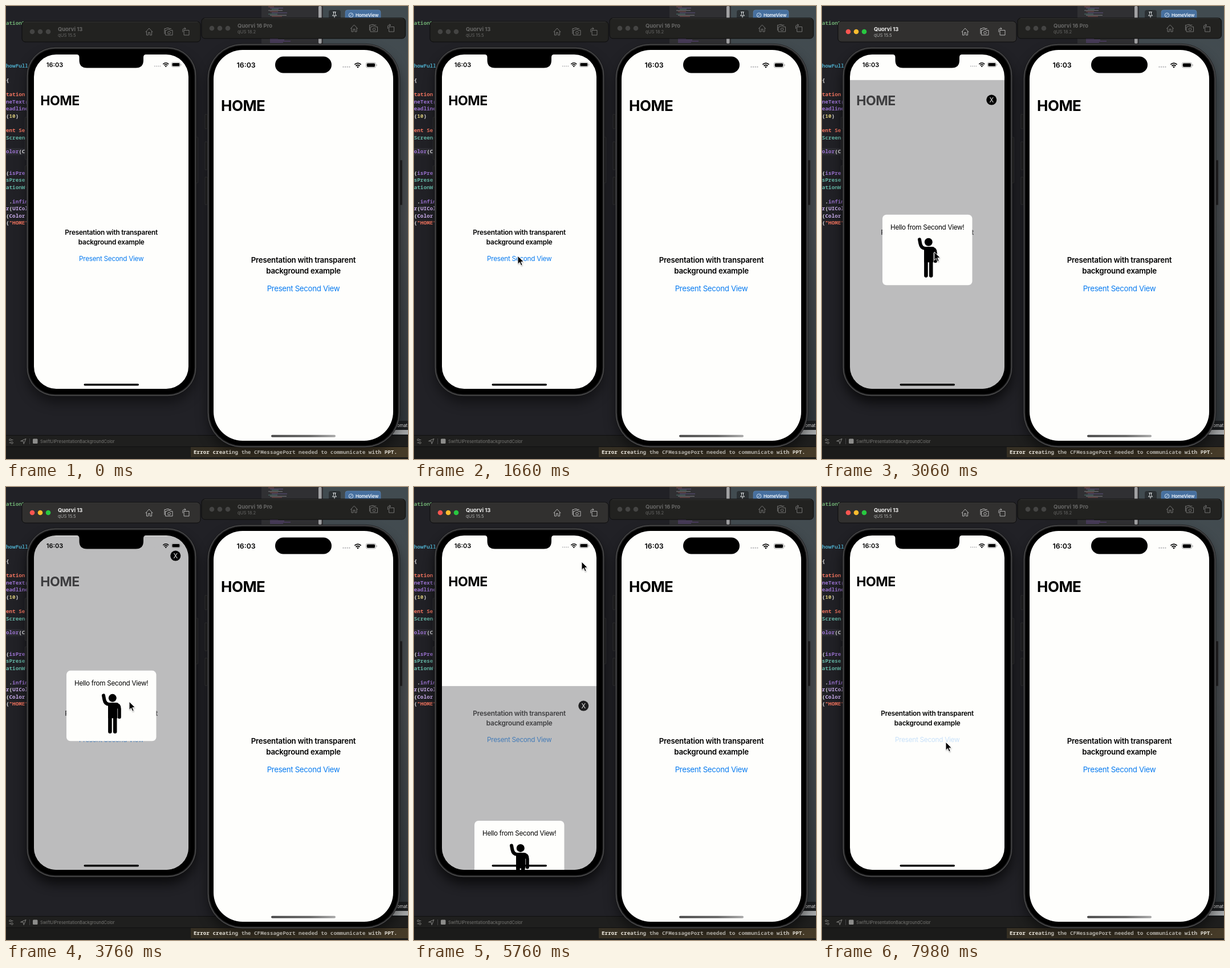
Write an HTML page that moves like this. It is 705 by 794 pixels and loops after 8000 ms.

```html
<!DOCTYPE html>
<html lang="en">
<head>
<meta charset="utf-8">
<title>Transparent presentation demo</title>
<style>
  html, body { margin: 0; width: 100%; height: 100%; overflow: hidden; background: #202024; }
  svg { display: block; width: 100vw; height: 100vh; font-family: Inter, Roboto, sans-serif; }
  .mono { font-family: "Noto Sans Mono", "DejaVu Sans Mono", monospace; white-space: pre; }
</style>
</head>
<body>
<svg id="stage" viewBox="0 0 705 794">
  <defs>
    <linearGradient id="canvasFill" x2="0" y2="1">
      <stop offset="0" stop-color="#414b50"/><stop offset=".5" stop-color="#474b4e"/><stop offset="1" stop-color="#30363a"/>
    </linearGradient>
    <linearGradient id="errorFill">
      <stop offset="0" stop-color="#352f23"/><stop offset="1" stop-color="#463b28"/>
    </linearGradient>
    <linearGradient id="barFill">
      <stop offset="0" stop-color="#4a4a4a"/><stop offset=".6" stop-color="#666"/><stop offset="1" stop-color="#aaa"/>
    </linearGradient>
    <filter id="blur" x="-30%" y="-30%" width="160%" height="160%"><feGaussianBlur stdDeviation="11"/></filter>
    <filter id="soft" x="-50%" y="-50%" width="200%" height="200%"><feGaussianBlur stdDeviation="1.2"/></filter>
    <clipPath id="screen"><rect x="49" y="85" width="271" height="586" rx="39"/></clipPath>
  </defs>
  <g id="desk"></g>
  <g id="devices"></g>
  <g id="cursor">
    <path d="M0 0V14.5L3.4 11.3 5.8 17 8.2 16 5.8 10.4H10.4Z" transform="translate(.5 1.5)" opacity=".35" filter="url(#soft)"/>
    <path d="M0 0V14.5L3.4 11.3 5.8 17 8.2 16 5.8 10.4H10.4Z" stroke="#fff" stroke-width="1" stroke-linejoin="round"/>
  </g>
</svg>
<script>
const $ = id => document.getElementById(id);
const LOOP = 8000;
const INK = "#000", PAPER = "#fefefc", BLUE = "#0a7cf0";

const rect = (x, y, w, h, fill, rx = 0, more = "") =>
  `<rect x="${x}" y="${y}" width="${w}" height="${h}" rx="${rx}" fill="${fill}" ${more}/>`;
const dot = (x, y, r, fill, more = "") => `<circle cx="${x}" cy="${y}" r="${r}" fill="${fill}" ${more}/>`;
const text = (x, y, size, str, fill = INK, weight = 400, more = "") =>
  `<text x="${x}" y="${y}" font-size="${size}" fill="${fill}" font-weight="${weight}" ${more}>${str}</text>`;
const path = (d, color, width = 1, more = "") =>
  `<path d="${d}" fill="none" stroke="${color}" stroke-width="${width}" stroke-linecap="round" stroke-linejoin="round" ${more}/>`;
const centred = (x, y, size, str, fill, weight, spacing) =>
  text(x, y, size, str, fill, weight, `text-anchor="middle" letter-spacing="${spacing}em"`);

// Editor window behind the simulators
function desk() {
  const red = "#f0745f", purple = "#9a72cf", lilac = "#cfb0f2", teal = "#65b6a6", white = "#e4e4e6";
  const code = [
    [33, "ationF", "#6fae72"], [108, "howFull", "#4ca6c2"], [133, "{", white],
    [158, "tation", red], [170.5, "neText(", purple], [183, "eadline", purple],
    [195.5, `(<tspan fill="#d5c77a">10</tspan>)`, white], [220.5, "ent Se", red],
    [233.5, "Screen", teal], [258, `olor<tspan fill="${white}">(C</tspan>`, purple],
    [295.5, `(<tspan fill="${purple}">isPre</tspan>`, white], [308, "sPrese", teal],
    [320.5, "ationW", teal], [345.5, ` .<tspan fill="${purple}">infin</tspan>`, white],
    [358, `r<tspan fill="${white}">(</tspan>UICol`, lilac],
    [370.5, `(<tspan fill="${lilac}">Color</tspan>`, white],
    [383, `(<tspan fill="${red}">"HOME"</tspan>`, white]
  ];
  const tints = ["#a85a58", "#7b6bb0", "#5f9c90", "#a9a9ac"];
  let mini = "";
  for (let i = 0; i < 9; i++)
    mini += rect(460 + (i % 3) * 3, 1 + i * 2.1, 10 + (i * 13) % 24, 1, tints[i % 4], 0, 'opacity=".65"');
  for (let i = 0; i < 4; i++)
    mini += rect(463, 57 + i * 2.1, 14 + (i * 11) % 24, 1, "#7652a0", 0, 'opacity=".7"');

  return rect(0, 0, 705, 794, "#212126") +
    rect(0, 249, 36, 12.5, "#2b2b31") +
    code.map(([y, s, c]) => text(0, y, 9.25, s, c, 600, 'class="mono"')).join("") +
    rect(448, 0, 108, 66, "#303033") + mini +
    rect(548, 0, 5.5, 66, "#a2a2a4", 2) +
    rect(556, 0, 149, 752, "url(#canvasFill)") +
    rect(566, 7, 21, 18, "#2b3033", 4) +
    path("M573.5 10.5H578.5M574.5 10.5V14.5L572.5 17H579.5L577.5 14.5V10.5M576 17V21", "#e0e3e5") +
    rect(595, 7, 62, 18, "#47709f", 4, 'stroke="#6089b5" stroke-width=".6"') +
    dot(605, 16, 3.8, "none", 'stroke="#dbe8f8" stroke-width=".9"') + path("M603.4 17.5L606.6 14.4", "#dbe8f8", .9) +
    text(613, 18.8, 8, "HomeView", "#f2f6fc", 600, 'letter-spacing="-.02em"') +
    rect(680, 727, 25, 16, "#1c1e20") + text(686, 738, 7.6, "omat", "#e8e8e8") +
    rect(675, 743, 30, 8, "#a5a7a8") +
    rect(0, 752, 705, 42, "#1f1f1e") + rect(0, 752, 705, 1, "#0f0f10") +
    rect(0, 772, 705, 22, "#1b1b1a") + rect(0, 772, 705, 1, "#101011") +
    path("M6 760.5H12M6 765.5H12", "#858583", 1.1) +
    dot(7.5, 760.5, 1.7, "#1f1f1e", 'stroke="#858583"') + dot(10.5, 765.5, 1.7, "#1f1f1e", 'stroke="#858583"') +
    path("M26 762.5L35 758.5 31.2 767.5 30.3 763.3Z", "#858583") + rect(41, 758, .8, 10, "#4b4b4d") +
    rect(47, 758.5, 8.5, 8.5, "#8c8c8a", 1.5) +
    text(60, 765.7, 7.45, "SwiftUIPresentationBackgroundColor", "#787875") +
    rect(324, 773, 381, 18, "url(#errorFill)") +
    text(329, 784.5, 9.3, "Error creating the CFMessagePort needed to communicate with PPT.", "#f0ece2", 700, 'class="mono"');
}

function titleBar(x, y, w, name, system, key) {
  const cy = y + 18, dots = ["#fb5550", "#fdbc2e", "#28c840"];
  const icons = [
    "M-6 .5L0 -6 6 .5M-4.5 -.5V6H-1.4V1.5H1.4V6H4.5V-.5",
    "M-5 -2.5H-3L-2 -4H2L3 -2.5H7V6H-5ZM-7 3.5V-5.5H-4L-3.5 -6.5H.5L1 -5.5H4.5"
  ];
  return rect(x, y, w, 36, "#222220", 6, `id="${key}Bar" stroke="#0c0c0c" stroke-width="1"`) +
    path(`M${x + 5} ${y + .9}H${x + w - 5}`, "#40403f", .7) +
    dots.map((c, i) => dot(x + 18 + 14 * i, cy, 4.3, "#444443") + dot(x + 18 + 14 * i, cy, 4.3, c, `class="${key}On"`)).join("") +
    text(x + 63, y + 16.8, 9.4, name, "#666665", 700, `id="${key}Name"`) +
    text(x + 63, y + 26.6, 7.7, system, "#666665", 400, `id="${key}System"`) +
    `<g id="${key}Icons" opacity=".52">` +
    path(icons[0], "#bbb", 1, `transform="translate(${x + w - 90} ${cy})"`) +
    `<g transform="translate(${x + w - 56} ${cy})">${path(icons[1], "#bbb") + dot(1, 1.8, 2.3, "none", 'stroke="#bbb"')}</g>` +
    path("M-3.5 -2.5H5V6H-3.5ZM-6 .5V-3Q-6 -5.5 -3.5 -5.5H-1M-2.8 -7.3L-1 -5.5 -2.8 -3.7", "#bbb", 1, `transform="translate(${x + w - 25} ${cy})"`) +
    "</g>";
}

function shell(x, y, w, h, r, buttons, key) {
  const ring = (inset, fill, stroke, width) =>
    rect(x + inset, y + inset, w - 2 * inset, h - 2 * inset, fill, r - inset, `stroke="${stroke}" stroke-width="${width}"`);
  return rect(x + 2, y + 14, w - 4, h - 4, "#000", r, `id="${key}Shadow" filter="url(#blur)" opacity=".5"`) +
    buttons.map(([bx, by, bh]) => rect(bx, by, 4, bh, "#19191a", 1, 'stroke="#39393b" stroke-width=".6"')).join("") +
    ring(.3, "#333334", "#161617", .8) + ring(1.3, "#262627", "#606061", .9) + ring(3.2, "#000", "#1c1c1d", 1);
}

function home(left, cx, top, lines, s, linkId) {
  return text(left, top, 33.2 * s, "HOME", INK, 700, 'letter-spacing="-.02em"') +
    centred(cx, lines[0], 17 * s, "Presentation with transparent", INK, 600, -.018) +
    centred(cx, lines[1], 17 * s, "background example", INK, 600, -.018) +
    `<g id="${linkId}">${centred(cx, lines[2], 17 * s, "Present Second View", BLUE, 400, -.026)}</g>`;
}

function status(x, y, dotsX, wifiX, batX, s) {
  let out = text(x, y, 15.8 * s, "16:03", INK, 600);
  for (let i = 0; i < 4; i++) out += dot(dotsX + i * 4.6 * s, y - 1.2, 1.5 * s, "#bcbcbe");
  return out +
    `<g transform="translate(${wifiX} ${y}) scale(${s})">` +
    path("M-7.2 -6.8Q0 -13.2 7.2 -6.8M-4.5 -3.9Q0 -7.7 4.5 -3.9", INK, 2.3, 'style="stroke-linecap:butt"') +
    `<path d="M-2.5 -1.9Q0 -4 2.5 -1.9L0 .8Z"/></g>` +
    `<g transform="translate(${batX} ${y}) scale(${s})">` +
    rect(0, -11.3, 22, 11.4, "none", 3.5, 'stroke="#999" stroke-width="1"') +
    rect(1.8, -9.5, 18.4, 7.8, INK, 2) + rect(23.2, -7.5, 1.5, 4, "#aaa", .8) + "</g>";
}

// Second view, drawn at its resting place
function sheet() {
  const wave = path("M171 364.5L172.3 371.5Q173.7 379.5 181 380.2H192Q198.8 380.6 198.8 388V402.5", INK, 6) +
    `<path d="M177 377.5H196V404.5H179V381Z"/>` +
    path("M182.4 400V427.8M191.2 400V427.8", INK, 6.6) + dot(186.8, 369, 7, INK) +
    path("M195.7 388V405", PAPER, .7);
  return rect(49, 85, 271, 586, "rgb(125,125,128)", 0, 'opacity=".5"') +
    `<g id="close">${dot(297.3, 119.7, 9, INK) + text(297.3, 123.7, 11.3, "X", "#e6e6e6", 400, 'text-anchor="middle"')}</g>` +
    rect(106, 321, 157.5, 123.5, PAPER, 7) +
    centred(184.7, 346.8, 11.7, "Hello from Second View!", INK, 400, -.026) + wave;
}

function devices() {
  const s1 = 271 / 390, s2 = 315 / 402;
  return shell(36, 72, 298, 612, 50, [[33.5, 195, 20], [33.5, 231, 38], [33.5, 280, 38], [332.5, 230, 80]], "a") +
    shell(353, 66, 338, 708, 61, [[349, 190, 25], [349, 238, 49], [349, 300, 48], [691, 270, 79]], "b") +
    rect(49, 85, 271, 586, PAPER, 39) +
    `<g clip-path="url(#screen)">${home(60.3, 184.7, 173.6, [400.6, 417.6, 447], s1, "link")}<g id="sheet">${sheet()}</g></g>` +
    `<path d="M124 85Q128.5 85 128.5 90V95Q128.5 108.5 142 108.5H227.5Q241 108.5 241 95V90Q241 85 245.5 85Z"/>` +
    status(70.8, 106.7, 260.8, 280.3, 290.3, s1) +
    rect(136.5, 662, 96.5, 3.5, INK, 1.75) +
    rect(364, 77, 315, 685, PAPER, 51) +
    home(377, 521.5, 184.3, [449.8, 468.6, 500], s2, "link2") +
    rect(472, 88.5, 99, 29, INK, 14.5) +
    status(404.6, 108, 591.5, 617, 631.3, s2) +
    rect(465, 751.7, 113, 4, "url(#barFill)", 2) +
    titleBar(28, 27, 313, "Quorvi 13", "qUS 15.5", "a") +
    titleBar(343, 21, 357.5, "Quorvi 16 Pro", "qUS 18.2", "b");
}

$("desk").innerHTML = desk();
$("devices").innerHTML = devices();
document.querySelectorAll(".bOn").forEach(e => e.remove());

const clamp = v => Math.min(1, Math.max(0, v));
const ease = u => u * u * (3 - 2 * u);
// Critically damped spring: share of the way still to go
const spring = ms => { const w = Math.max(0, ms) * .0066; return (1 + w) * Math.exp(-w); };

const OPEN = 2421, CLOSE = 5530;
const trail = [ // time, x, y of the pointer tip
  [850, 150, 800], [1500, 182, 438], [2450, 182, 438], [3060, 197, 431], [3500, 199, 428],
  [4500, 300, 121], [5430, 300, 121], [5760, 294, 131], [6740, 225, 474],
  [7500, 217, 447], [8000, 217, 447]
];

function pointer(t) {
  const i = trail.findIndex(p => p[0] > t);
  if (i < 1) return [150, 820];
  const [t0, x0, y0] = trail[i - 1], [t1, x1, y1] = trail[i];
  const u = ease((t - t0) / (t1 - t0));
  return [x0 + (x1 - x0) * u, y0 + (y1 - y0) * u];
}

const fade = (t, down, up) =>
  t < down ? 1 : t < up ? 1 - .78 * clamp((t - down) / 40) : .22 + .78 * clamp((t - up) / 420);

function draw(t) {
  const active = t >= 2250;
  $("aBar").setAttribute("fill", active ? "#31302f" : "#222220");
  $("aName").setAttribute("fill", active ? "#f0f0ef" : "#666665");
  $("aSystem").setAttribute("fill", active ? "#aaaaa9" : "#666665");
  $("aIcons").setAttribute("opacity", active ? .95 : .52);
  $("aShadow").setAttribute("opacity", active ? .75 : .5);
  document.querySelectorAll(".aOn").forEach(e => e.setAttribute("visibility", active ? "visible" : "hidden"));

  const left = t < CLOSE ? spring(t - OPEN) : 1 - spring(t - CLOSE);
  $("sheet").setAttribute("transform", `translate(0 ${586 * left})`);
  $("sheet").setAttribute("visibility", t < OPEN || left > .999 ? "hidden" : "visible");
  $("link").setAttribute("opacity", t < 5000 ? fade(t, 2300, 2400) : fade(t, 7880, 9000));
  $("close").setAttribute("opacity", fade(t, 5350, 5430));
  $("cursor").setAttribute("transform", `translate(${pointer(t)})`);
}

function tick() {
  draw(performance.now() % LOOP);
  requestAnimationFrame(tick);
}
tick();
</script>
</body>
</html>
```
